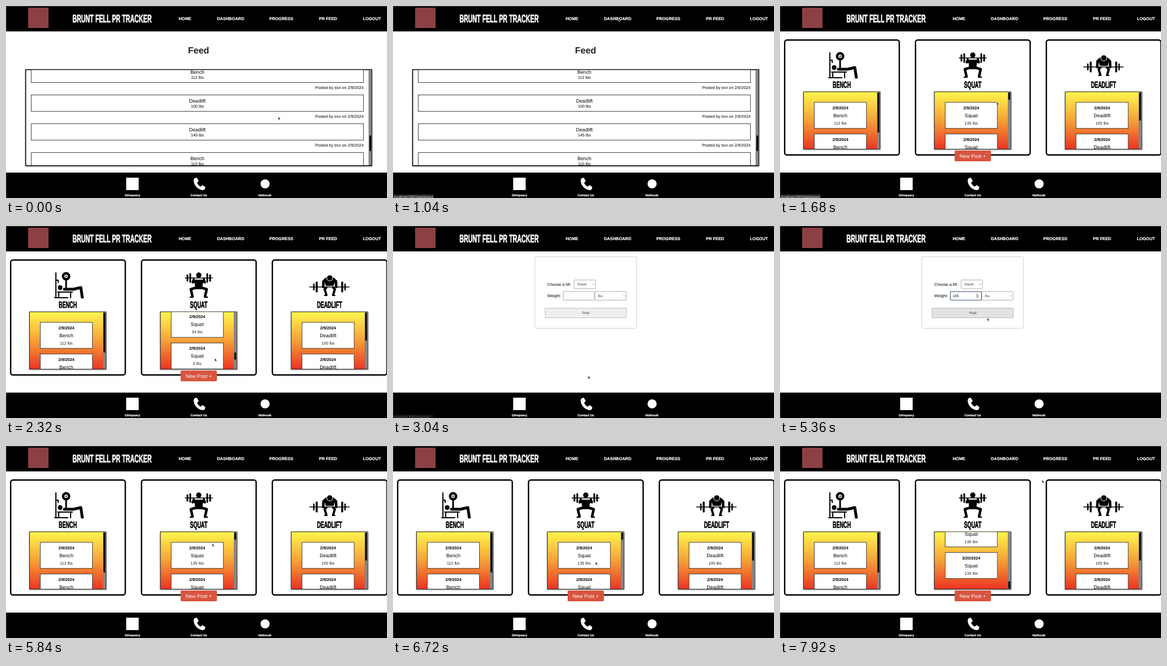
An HTML page for the animation above (8 s loop, 672 px wide and 340 px high).

```html
<!DOCTYPE html>
<html lang="en">
<head>
<meta charset="utf-8">
<title>PR tracker</title>
<style>
@property --scroll { syntax: "<number>"; inherits: true; initial-value: 0; }
html, body { margin: 0; width: 100%; height: 100%; overflow: hidden; background: #fff; }
svg { display: block; width: 672px; height: 340px; }
text { font-family: "Liberation Sans", Arial, sans-serif; text-rendering: geometricPrecision; white-space: pre; }
.b { font-weight: bold; }
.mid { text-anchor: middle; }
.end { text-anchor: end; }
.heavy { stroke: currentColor; stroke-width: .7; }
.crisp { stroke: currentColor; stroke-width: .2; }
.shadow { filter: drop-shadow(0 1px 1.5px #0006); }
.soft { filter: drop-shadow(0 .5px 1px #0002); }

.cut { animation: 8s step-end infinite; }
.feed { animation-name: feed; }
.dash { animation-name: dash; }
.form { animation-name: form; }
.added { animation-name: added; }
.focus { animation-name: focus; }
.key1 { animation-name: key1; }
.key2 { animation-name: key2; }
.key3 { animation-name: key3; }
.hover { animation-name: hover; }
.link1 { animation-name: link1; }
.link2 { animation-name: link2; }
@keyframes feed { 0% { opacity: 1 } 14%, to { opacity: 0 } }
@keyframes dash { 0% { opacity: 0 } 14% { opacity: 1 } 35.5% { opacity: 0 } 70%, to { opacity: 1 } }
@keyframes form { 0% { opacity: 0 } 35.5% { opacity: 1 } 70%, to { opacity: 0 } }
@keyframes added { 0% { opacity: 0 } 50%, to { opacity: 1 } }
@keyframes focus { 0% { opacity: 0 } 52% { opacity: 1 } 70%, to { opacity: 0 } }
@keyframes key1 { 0% { opacity: 0 } 57%, to { opacity: 1 } }
@keyframes key2 { 0% { opacity: 0 } 59%, to { opacity: 1 } }
@keyframes key3 { 0% { opacity: 0 } 61%, to { opacity: 1 } }
@keyframes hover { 0% { opacity: 0 } 65% { opacity: 1 } 70%, to { opacity: 0 } }
@keyframes link1 { 0% { opacity: 0 } 11.5% { opacity: 1 } 22.5%, to { opacity: 0 } }
@keyframes link2 { 0% { opacity: 0 } 34% { opacity: 1 } 37% { opacity: .4 } 39%, to { opacity: 0 } }

.scroller { animation: scroll 8s infinite; }
.scroller .rows { transform: translateY(calc(var(--scroll) * -1px)); }
.scroller .thumb { transform: translateY(calc(var(--scroll) * .122px)); }
@keyframes scroll {
  0%, 23% { --scroll: 0; animation-timing-function: ease-in-out; }
  29% { --scroll: 579; animation-timing-function: ease-out; }
  32% { --scroll: 654; }
  50% { --scroll: 654; animation-timing-function: step-end; }
  51%, 84% { --scroll: 0; animation-timing-function: ease-in-out; }
  90%, to { --scroll: 710; }
}

.cursor { animation: cursor 8s ease-in-out infinite; }
@keyframes cursor {
  0%, 1% { transform: translate(480px, 196px) }
  11%, 14% { transform: translate(397px, 21px) }
  20.5%, 23% { transform: translate(382px, 170px) }
  29%, 31% { transform: translate(368px, 234px) }
  34%, 45% { transform: translate(344px, 265px) }
  52%, 61% { transform: translate(326px, 121px) }
  66.5%, 70% { transform: translate(365.5px, 162.5px) }
  79%, 91% { transform: translate(357px, 205px) }
  99%, to { transform: translate(462px, 60px) }
}
</style>
</head>
<body>
<script>
const text = (x, y, size, label, cls = '', fill = '#000') =>
  `<text x="${x}" y="${y}" font-size="${size}" class="${cls}" fill="${fill}" color="${fill}">${label}</text>`;
const rect = (x, y, w, h, fill, more = '') =>
  `<rect x="${x}" y="${y}" width="${w}" height="${h}" fill="${fill}" ${more}/>`;
const disc = (x, y, r, fill = '#000') => `<circle cx="${x}" cy="${y}" r="${r}" fill="${fill}"/>`;
const line = (d, width) =>
  `<path d="${d}" fill="none" stroke="#000" stroke-width="${width}" stroke-linecap="round" stroke-linejoin="round"/>`;
const cut = (name, content) => `<g class="cut ${name}">${content}</g>`;
const display = (x, y, size, label, cls, fill) =>
  `<g transform="translate(${x} ${y}) scale(.55 1)">${text(0, 0, size, label, 'b heavy ' + cls, fill)}</g>`;

function header() {
  const links = [['HOME', 304.5], ['DASHBOARD', 372], ['PROGRESS', 464.5], ['PR FEED', 552], ['LOGOUT', 629.5]];
  return rect(0, 0, 672, 45, '#000') + rect(39, 3, 36, 36, '#8c4044') +
    display(117.2, 28.6, 19.4, 'BRUNT FELL PR TRACKER', '', '#fff') +
    links.map(([label, x]) => text(x, 25.4, 7.45, label, 'b crisp', '#fff')).join('');
}

function footer() {
  const phone = 'M333 305l3.5-1 3.5 6-3 3c1.5 3.5 3.5 5.5 6.5 7l3-3 5 3.5-.5 3c-1 2-3 2.8-5 2.5-8-1.5-14-8-15-16 0-2 .5-4 2-5z';
  return rect(0, 295, 672, 45, '#000') + rect(212, 304, 22, 22, '#fff') +
    `<path d="${phone}" fill="#fff"/>` + disc(457, 315, 8, '#fff') +
    [['Glimpsery', 223], ['Contact Us', 340], ['Hallnook', 456.5]]
      .map(([label, x]) => text(x, 337.3, 5.5, label, 'b mid crisp', '#fff')).join('');
}

function feed() {
  const posts = [['Bench', 112], ['Deadlift', 100], ['Deadlift', 145], ['Bench', 110]];
  const rows = posts.map(([lift, weight], i) => {
    const y = 106.5 + 51 * i;
    return rect(44.5, y, 586, 29, '#fff', 'stroke="#444"') +
      text(337.5, y + 13.5, 8.7, lift, 'mid') +
      text(337.5, y + 22, 7.2, weight + ' lbs', 'mid') +
      text(630.5, y + 40.5, 7.2, 'Posted by tovi on 2/9/2024', 'end');
  }).join('');
  return text(339.7, 84, 16, 'Feed', 'b mid', '#222') +
    rect(34.7, 112.7, 610.3, 170, '#fff', 'class="shadow" stroke="#000" stroke-width="1.5"') +
    `<g clip-path="url(#feedClip)">${rows}</g>` +
    rect(639.5, 113.5, 5, 168.5, '#858585') + rect(641, 229, 3, 28, '#000', 'rx="1.5"');
}

const icons = {
  BENCH: line('M88 83V127M86 127H109M88 96H92V100M93 117V127M91 117H117M114 117V127', 2) +
    disc(106, 89, 7.5) + disc(106, 89, 3, '#fff') + disc(106, 89, 1.3) + disc(95.5, 109, 4.2) +
    line('M106 97V109', 3) + line('M103 112H119L132 109 134.5 126', 5) + line('M133 126.5H136', 2.5),
  SQUAT: line('M316 92H364', 1.5) + line('M320 87V97M360 87V97', 3) + line('M325 85V99M355 85V99', 3) +
    disc(340, 87, 4.7) + line('M331 94L329 100 335 98H345L351 100 349 94', 3.5) +
    '<path d="M332 95H348L346 112H334z"/>' +
    line('M336 109L326 112 329 125M344 109L354 112 351 125', 4.5) +
    line('M325 126H329M351 126H355', 2.5),
  DEADLIFT: line('M535.5 108H605.5', 1.3) + line('M543 103V113M598 103V113', 2.5) +
    line('M548 100V116M593 100V116', 3.5) +
    line('M559.5 108L560 98 565 93.5M582.5 108L582 98 577 93.5', 4.5) +
    '<path d="M561 95Q571 88 581 95L578 106H564z"/>' +
    disc(571, 92, 5.8, '#fff') + disc(571, 92, 4.8) +
    line('M565 109L562 112 565 122M577 109L580 112 577 122', 4) + line('M562 123H566M576 123H580', 2.2)
};

function liftCard(name, index, weights, thumb, scroller) {
  const lift = name[0] + name.slice(1).toLowerCase();
  const left = 230.8 * index;
  const rows = weights.map((weight, i) => {
    const y = 170.7 + 56 * i;
    const added = i === 13;
    const row = rect(60.5, y, 92, 46, '#fff', 'stroke="#333" stroke-width=".9"') +
      text(106.4, y + 12, 7.2, added ? '3/20/2024' : '2/9/2024', 'b mid') +
      text(106.4, y + 26, 8.7, lift, 'mid') +
      text(106.4, y + 39.3, 7.2, weight + ' lbs', 'mid', '#222');
    return added ? cut('added', row) : row;
  }).join('');
  return `<g transform="translate(${left} 0)">` +
    rect(8.2, 60.2, 202.2, 203.6, '#fff', 'rx="4" stroke="#000" stroke-width="2.4"') +
    display(109, 144.8, 16.3, name, 'mid') +
    rect(41.5, 152, 135, 101.5, 'url(#heat)', 'class="shadow" stroke="#222"') +
    `<g class="${scroller ? 'scroller' : ''}">
      <g clip-path="url(#listClip)"><g class="rows">${rows}</g></g>
      ${rect(171, 152.5, 5, 100.5, '#858585')}
      ${rect(172, 153, 3, thumb, '#000', 'rx="1.5" class="thumb"')}
    </g></g>` + icons[name];
}

function dashboard() {
  const squats = [135, 115, 95, 185, 205, 125, 155, 145, 65, 45, 34, 3, 135, 135];
  return liftCard('BENCH', 0, [112, 110], 71) + liftCard('SQUAT', 1, squats, 13, true) +
    liftCard('DEADLIFT', 2, [100, 145, 120], 50) +
    rect(308, 256, 64, 19, '#d9543f', 'rx="2"') + text(340, 268.7, 9, 'New Post +', 'mid', '#fff');
}

function form() {
  const field = (x, y, w) => rect(x, y, w, 15.3, '#fff', 'rx="1" stroke="#8c8c8c" stroke-width=".7"');
  const chevron = (x, y) => `<path d="M${x - 1.5} ${y - .8}l1.5 1.6 1.5-1.6" fill="none" stroke="#666" stroke-width=".6"/>`;
  const button = fill => rect(268.3, 145.5, 143, 17, fill, 'stroke="#b4b4b4" stroke-width=".8"') +
    text(340, 156.2, 6.3, 'Post', 'mid', '#333');
  const digit = (n, x, key) => cut(key, text(x, 126.1, 6.3, n));
  const focused = rect(300.5, 116.3, 54.8, 15, '#fff', 'rx="1" stroke="#4c5f8c" stroke-width="1.1"') +
    digit(1, 304.5, 'key1') + digit(3, 308, 'key2') + digit(5, 311.5, 'key3') +
    rect(345.8, 119.8, 4.5, 8, '#eee', 'rx="1" stroke="#aaa" stroke-width=".5"') +
    '<path d="M346.8 123l1.25-1.8 1.25 1.8zM346.8 124.7l1.25 1.8 1.25-1.8z" fill="#444"/>';
  return rect(250.3, 54.3, 179, 126.7, '#fff', 'rx="3" class="soft" stroke="#d4d4d4" stroke-width=".8"') +
    text(272, 105.5, 7.2, 'Choose a lift:') + field(319.5, 95.6, 37.5) +
    text(325, 105.3, 6.3, 'Squat', '', '#444') + chevron(353, 103.2) +
    text(272, 126.4, 7.2, 'Weight:') + field(300.3, 116, 55) + field(356, 116, 55.3) +
    text(361.5, 126.1, 6.3, 'lbs', '', '#444') + chevron(407.3, 123.7) +
    cut('focus', focused) + button('#eef0f0') + cut('hover', button('#e3e3e3'));
}

const status = (name, path) => cut(name,
  rect(0, 334, 71, 6, '#303030') + text(2, 340.4, 6, 'localhost:3001/' + path, '', '#ccc'));

// Faint window edge along the top and beside the dark bars.
const windowEdge = rect(0, 0, 672, .6, '#666') + rect(0, 0, .5, 45, '#666') + rect(0, 295, .5, 45, '#666');

document.body.innerHTML = `<svg viewBox="0 0 672 340">
  <defs>
    <clipPath id="feedClip"><rect x="35.5" y="113.5" width="608" height="168.5"/></clipPath>
    <clipPath id="listClip"><rect x="42" y="152.5" width="134" height="100.5"/></clipPath>
    <linearGradient id="heat" x2="0" y2="1">
      <stop stop-color="#fff64d"/><stop offset=".5" stop-color="#f6a137"/><stop offset="1" stop-color="#eb3323"/>
    </linearGradient>
  </defs>
  ${rect(0, 0, 672, 340, '#fff')}
  ${cut('feed', feed())}${cut('dash', dashboard())}${cut('form', form())}
  ${header()}${footer()}${windowEdge}
  ${status('link1', 'dashboard')}${status('link2', 'newpost')}
  <path class="cursor" d="M.2 0V5.7L1.5 4.6 2.4 6.7 3.3 6.3 2.4 4.2H4.1z" stroke="#fff" stroke-width=".6"/>
</svg>`;
</script>
</body>
</html>
```
